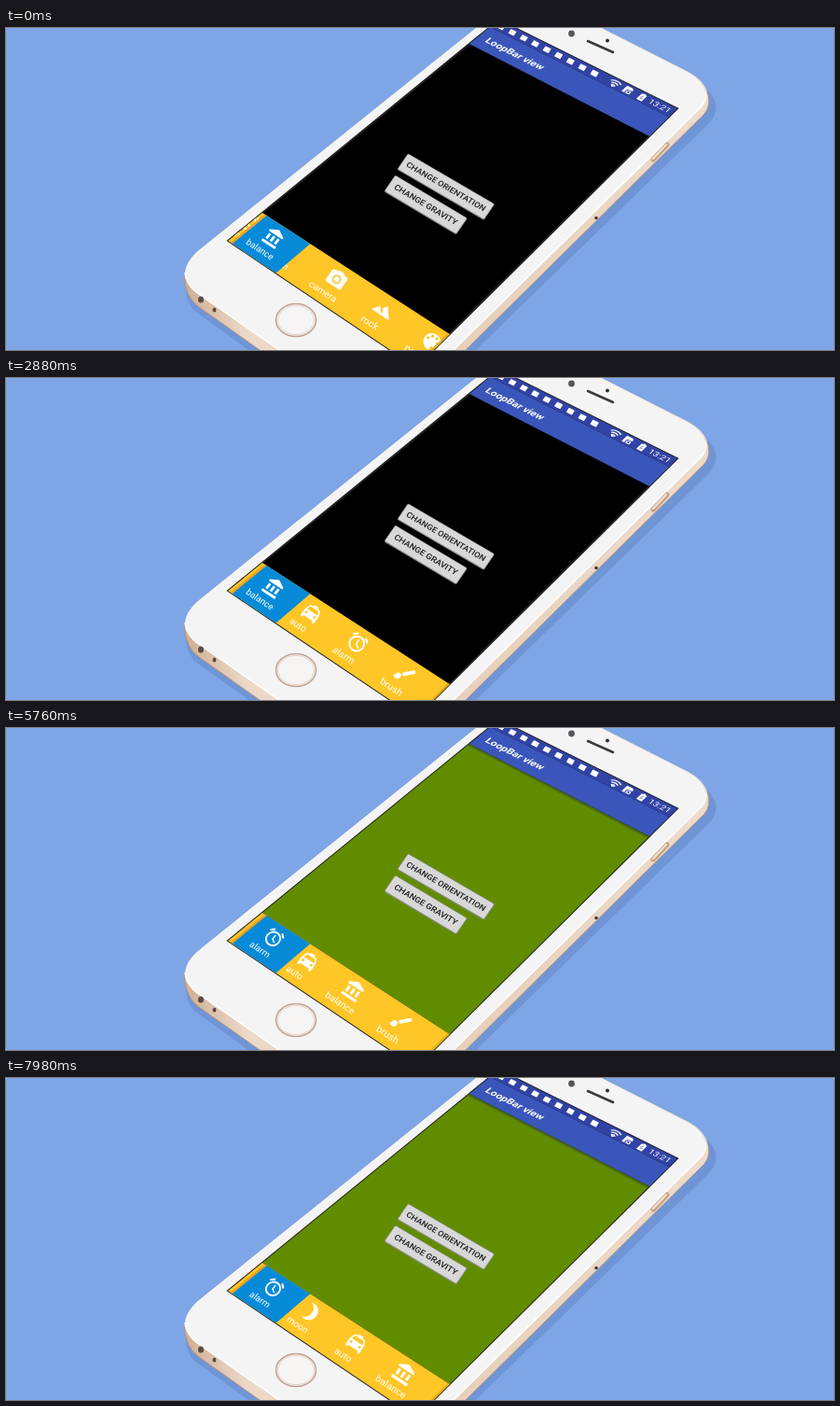
Recreate the animation shown at these times as an HTML page. Size 888 by 345 pixels, loop 8 s.

```html
<!DOCTYPE html>
<html lang="en">
<head>
<meta charset="utf-8">
<title>LoopBar view</title>
<style>
  html, body { margin: 0; width: 100%; height: 100%; overflow: hidden; background: #7ea5e6; }
  svg { display: block; width: 100%; height: 100%; }
  text { font-family: Roboto, sans-serif; }
</style>
</head>
<body>
<svg id="stage" viewBox="0 0 888 345" preserveAspectRatio="none">
  <defs>
    <linearGradient id="rim" x1="0" y1="0" x2="1" y2="0">
      <stop offset="0" stop-color="#cfae94"/>
      <stop offset=".12" stop-color="#ecd9c8"/>
      <stop offset=".5" stop-color="#e6cfba"/>
      <stop offset="1" stop-color="#eddccd"/>
    </linearGradient>
    <clipPath id="barClip"><polygon id="barShape"/></clipPath>
  </defs>
  <g id="phone">
    <path fill="#6f95d6" d="M500 20L214 250Q180 277 202 303L260 345H504L754 102Q769 85 754 68L660 20z"/>
    <path fill="url(#rim)" d="M504 0L212 234Q182 256 196 286Q200 294 207 299L272 345H493L749 92Q757 82 752 68Q748 56 732 47L639 0z"/>
    <path fill="none" stroke="#b4937a" d="M191 264Q192 289 207 299L272 345M493 345L749 92Q757 82 752 68"/>
    <path fill="#f4f4f4" d="M504 0L212 234Q193 248 192 262Q193 276 208 286L293 345H480L742 88Q753 78 750 69Q747 56 732 48L638 0z"/>
    <path fill="none" stroke="#fff" stroke-width="1.500" d="M293 345L208 286Q193 276 192 262M480 345L742 88Q753 78 750 69"/>
    <path fill="none" stroke="#c29f82" stroke-width="5" stroke-linecap="round" d="M709 125L694 141"/>
    <path fill="none" stroke="#f0dfd0" stroke-width="2.500" stroke-linecap="round" d="M708 125L694 140"/>
    <circle cx="633" cy="203.500" r="1.800" fill="#4a3b34"/>
    <ellipse cx="209" cy="291" rx="3" ry="3.500" fill="#5a4a42"/>
    <ellipse cx="223.500" cy="302" rx="2" ry="2.500" fill="#5a4a42"/>
    <path stroke="#3a3a3c" stroke-width="2.600" stroke-linecap="round" d="M624 14L651 26"/>
    <circle cx="645" cy="13.500" r="1.900" fill="#2b2b30"/>
    <circle cx="606.500" cy="6" r="3.400" fill="#55555b"/>
    <ellipse cx="311" cy="313" rx="21.500" ry="17.500" fill="#f2efed" stroke="#c3a292" stroke-width="1.500"/>
    <ellipse cx="311" cy="313" rx="19.500" ry="15.600" fill="#f7f5f4" stroke="#e3d5cc"/>
  </g>
</svg>
<script>
const stage = document.getElementById('stage');
const LOOP = 8000, W = 360, H = 488, TOP = -80, BOTTOM = 558, STEP = 88, MID = 526;
const UPRIGHT = 'skewX(13)'; // glyphs and buttons lean less than the screen plane

// Perspective of the phone screen, in dp; v = 0 is the top of the content area.
function project(U, V) {
  const u = U / W, v = V / H, w = 1 - 0.0737 * u - 0.118 * v;
  return { x: (142.1 * u - 254.5 * v + 497) / w, y: (90.5 * u + 157.6 * v + 17) / w, w };
}

// Local affine frame of the screen plane at one point.
function at(U, V, s = 1) {
  const { x, y, w } = project(U, V);
  const kx = s / w / W, ky = s / w / H;
  const m = [(142.1 + 0.0737 * x) * kx, (90.5 + 0.0737 * y) * kx,
    (-254.5 + 0.118 * x) * ky, (157.6 + 0.118 * y) * ky, x, y];
  return `matrix(${m.map(n => n.toFixed(4))})`;
}

function quad(u0, v0, u1, v1) {
  return [[u0, v0], [u1, v0], [u1, v1], [u0, v1]]
    .map(([u, v]) => { const p = project(u, v); return p.x.toFixed(2) + ',' + p.y.toFixed(2); }).join(' ');
}

function add(parent, tag, attrs, text) {
  const el = document.createElementNS(stage.namespaceURI, tag);
  for (const k in attrs) el.setAttribute(k, attrs[k]);
  if (text) el.textContent = text;
  parent.appendChild(el);
  return el;
}
const panel = (box, fill, more) => add(stage, 'polygon', { points: quad(...box), fill, ...more });
const dot = (x, y, r) => `M${x - r} ${y}a${r} ${r} 0 1 0 ${2 * r} 0a${r} ${r} 0 1 0 ${-2 * r} 0z`;

const icons = {
  balance: 'M4 10h3v7H4zM10 10h3v7h-3zM16 10h3v7h-3zM2 19h19v3H2zM11.500 1L21 6v2H2V6z',
  moon: 'M9 2a10 10 0 1 1-3 19.500a10 10 0 0 0 0-19a10 10 0 0 1 3-.5z',
  auto: 'M5 6C5.200 5.400 5.800 5 6.500 5H9V3h6v2h2.500c.7 0 1.200.4 1.400 1L21 12v8a1 1 0 0 1-1 1h-1a1 1 0 0 1-1-1v-1H6v1a1 1 0 0 1-1 1H4a1 1 0 0 1-1-1v-8zM5 11h14l-1.500-4.500h-11z' +
    dot(6.5, 14.5, 1.5) + dot(17.5, 14.5, 1.5),
  alarm: dot(12, 13, 9) + dot(12, 13, 7) +
    'M11 8h1.500v5.300l4 2.300-.8 1.300L11 14zM2 5.700l4.600-3.900 1.300 1.600-4.600 3.800zM22 5.700l-4.600-3.900-1.300 1.600 4.600 3.800z',
  brush: 'M7 14a3 3 0 0 0-3 3c0 1.300-1.200 2-2 2c1 1.200 2.500 2 4 2a4 4 0 0 0 4-4a3 3 0 0 0-3-3zM20.700 4.600l-1.300-1.300a1 1 0 0 0-1.400 0l-9 9L11.700 15l9-9a1 1 0 0 0 0-1.400z',
  camera: 'M9 2L7.200 4H4a2 2 0 0 0-2 2v12a2 2 0 0 0 2 2h16a2 2 0 0 0 2-2V6a2 2 0 0 0-2-2h-3.200L15 2z' +
    dot(12, 12, 5) + dot(12, 12, 3.2),
  rock: 'M14 6l-3.700 5 2.800 3.800-1.600 1.200L7 10l-6 8h22z',
  palette: 'M12 3a9 9 0 1 0 0 18c1 0 1.800-1 1.200-2.400c-.6-1.500.3-2.400 1.400-2.400H16a5 5 0 0 0 5-5c0-4.500-4-8.200-9-8.200z' +
    dot(6.5, 10.5, 1.5) + dot(9.5, 6.5, 1.5) + dot(14.5, 6.5, 1.5) + dot(17.5, 10.5, 1.5)
};

function makeItem(parent, name) {
  const g = add(parent, 'g', { fill: '#fff' });
  add(g, 'path', {
    d: icons[name], 'fill-rule': 'evenodd', transform: `translate(0 -13) ${UPRIGHT} scale(1.45) translate(-12 -12)`
  });
  add(g, 'text', { y: 5, transform: `translate(0 15) ${UPRIGHT}`, 'font-size': 15, 'text-anchor': 'middle' }, name);
  return g;
}

function put(g, x, alpha = 1, scale = 1) {
  g.setAttribute('transform', at(x, MID, scale));
  g.setAttribute('opacity', alpha);
}

// Screen, header and status bar
panel([0, TOP, W, BOTTOM], '#000', { stroke: '#222', 'stroke-width': 2 });
const page = panel([0, 0, W, H], '#628c00');
panel([0, 0, W, 6], '#000', { opacity: 0.15 });
panel([0, 0, W, 3], '#000', { opacity: 0.15 });
panel([0, -56, W, 0], '#3b56ba');
panel([0, TOP, W, -56], '#3143a5');
add(stage, 'text', { transform: at(16, -27), y: 7, 'font-size': 20, 'font-weight': 600, fill: '#fff' }, 'LoopBar view');

const status = U => add(stage, 'g', { transform: at(U, -68), fill: '#fff' });
for (let i = 0; i < 9; i++) {
  add(status(14.5 + 24.2 * i), 'rect', { x: -6, y: -6, width: 12, height: 12, rx: 1, transform: UPRIGHT });
}
add(status(248.5), 'path', {
  d: 'M-10 -3Q0 -11 10 -3M-6.500 1Q0 -4 6.500 1M-3 5Q0 2 3 5L0 8z', stroke: '#fff', 'stroke-width': 2.4, fill: 'none'
});
const card = status(274);
add(card, 'path', { d: 'M-7 -8H4L7 -5V8H-7z' });
add(card, 'path', { d: dot(3, 4, 5), stroke: '#3143a5', 'stroke-width': 1.5 });
add(card, 'path', { d: 'M1 2l4 4M5 2l-4 4', stroke: '#3143a5', 'stroke-width': 1.5 });
const cell = status(301);
add(cell, 'path', { d: 'M-5 -7H-2V-9H2V-7H5V9H-5z' });
add(cell, 'path', { d: 'M1 -4L-2 2H2L-1 6', fill: 'none', stroke: '#8794d0', 'stroke-width': 1.5 });
add(status(334.5), 'text', { y: 5.5, 'font-size': 16, 'text-anchor': 'middle' }, '13:21');

// Buttons
function button(V, w, label) {
  const g = add(add(stage, 'g', { transform: at(W / 2, V) }), 'g', { transform: UPRIGHT });
  add(g, 'rect', { x: -w / 2, y: -18, width: w, height: 36, rx: 3, fill: '#8b8b8b' });
  add(g, 'rect', { x: -w / 2 + 1.2, y: -17, width: w - 2.4, height: 33, rx: 2, fill: '#d9d8d9' });
  add(g, 'text', { y: 4.5, 'font-size': 14.5, 'font-weight': 500, 'text-anchor': 'middle', fill: '#1c1c1c' }, label);
}
button(279, 170, 'CHANGE ORIENTATION');
button(326, 141, 'CHANGE GRAVITY');

// Loop bar
document.getElementById('barShape').setAttribute('points', quad(0, H, W, BOTTOM));
panel([0, H, W, BOTTOM], '#ffc627');
const bar = add(stage, 'g', { 'clip-path': 'url(#barClip)' });
const names = ['moon', 'auto', 'alarm', 'brush', 'camera', 'rock', 'palette'];
const slots = names.map(n => makeItem(bar, n));
const returned = makeItem(bar, 'balance');
panel([5, H, 9, BOTTOM], '#eea11c');
panel([W - 3, H, W, BOTTOM], '#e9ac16');
panel([9, H, 98, BOTTOM], '#078bd8');
const picked = { balance: makeItem(stage, 'balance'), alarm: makeItem(stage, 'alarm') };

const ramp = (t, a, b) => Math.min(1, Math.max(0, (t - a) / (b - a)));
const smooth = p => p * p * (3 - 2 * p);

// Position of the "auto" item along the bar
function scroll(t) {
  if (t < 4260) return 125 + 401 * Math.pow(1 - ramp(t, 0, 2640), 2.4);
  return 125 - 15 * smooth(ramp(t, 4260, 5160)) + 18 * smooth(ramp(t, 5160, 6420)) + 84 * smooth(ramp(t, 6420, 7980));
}

function draw(t) {
  const edge = W * Math.pow(1 - ramp(t, 3180, 3680), 5);
  page.setAttribute('points', quad(edge, 0, W, H));

  const base = scroll(t), span = STEP * names.length, swap = ramp(t, 3480, 4200);
  const wrap = x => ((x + 130) % span + span) % span - 130;
  slots.forEach((g, i) => {
    const x = wrap(base + STEP * (i - 1));
    if (names[i] === 'alarm') {
      put(g, x + 96 * swap, 1 - swap);
      put(returned, x, swap);
    } else put(g, x);
  });

  const out = ramp(t, 3180, 3480), back = ramp(t, 3480, 4080);
  put(picked.balance, 48.5, 1 - out, 1 - 0.5 * out);
  put(picked.alarm, 48.5, Math.min(1, back * 2), 0.5 + 0.5 * back);
}

const start = performance.now();
function tick() {
  draw((performance.now() - start) % LOOP);
  requestAnimationFrame(tick);
}
tick();
</script>
</body>
</html>
```
